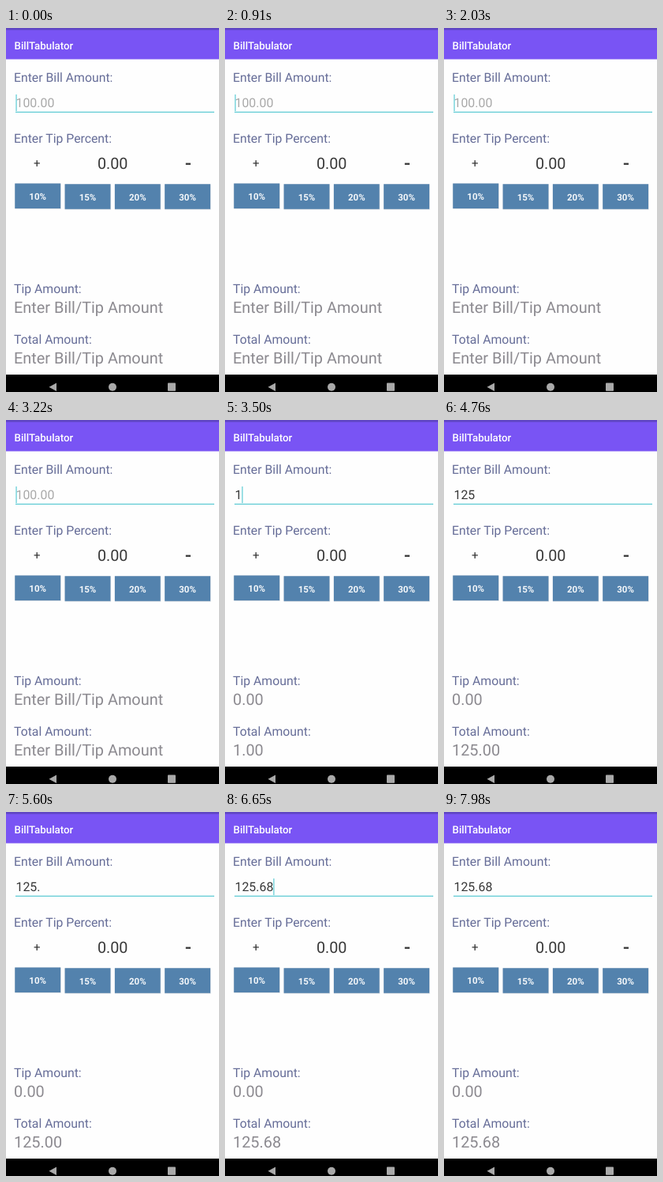
Animation, 270 px wide and 460 px high, one loop 8 s. Source, as an HTML page:

```html
<!DOCTYPE html>
<html lang="en">
<head>
<meta charset="utf-8">
<style>
  html, body { margin: 0; width: 100%; height: 100%; overflow: hidden; background: #fefefe; }
  svg { display: block; width: 270px; height: 460px; font-family: Roboto, sans-serif; text-rendering: geometricPrecision; }
  .label { font-size: 15.8px; fill: #666d98; }
  .result { font-size: 19.9px; fill: #8c8a90; }
  .mid { text-anchor: middle; fill: #383838; }
  .button { text-anchor: middle; font-size: 11.5px; font-weight: 700; fill: #f4f7fa; }
</style>
</head>
<body>
<svg viewBox="0 0 270 460">
  <rect width="270" height="460" fill="#fefefe"/>
  <rect width="270" height="39.5" fill="#7954f4"/>
  <rect width="270" height="2.5" fill="#5f45c2"/>
  <text x="10.5" y="27" font-size="13.3" font-weight="500" fill="#fff">BillTabulator</text>

  <text class="label" x="10" y="67.6">Enter Bill Amount:</text>
  <text id="bill" x="12.5" y="100.2" font-size="15.9"></text>
  <rect x="12" y="105.7" width="252" height="1.2" fill="#56c8d2"/>
  <rect id="caret" y="84" width="1.1" height="21" fill="#4cc6cf"/>

  <text class="label" x="10" y="144.6">Enter Tip Percent:</text>
  <text class="mid" x="39.2" y="176" font-size="15">+</text>
  <text class="mid" x="135.2" y="178" font-size="19.8">0.00</text>
  <text class="mid" x="231" y="178.8" font-size="24" font-weight="500">-</text>
  <g id="buttons"></g>

  <text class="label" x="10" y="334.8">Tip Amount:</text>
  <text class="result" id="tip" x="10" y="360"></text>
  <text class="label" x="10" y="398.6">Total Amount:</text>
  <text class="result" id="total" x="10" y="424"></text>

  <rect y="438" width="270" height="22"/>
  <g fill="#a9a9a9">
    <path d="M54.5 453.7 L64 448.4 V459 Z"/>
    <circle cx="135" cy="453.7" r="5"/>
    <rect x="205" y="448.5" width="10" height="10.3" rx="0.8"/>
  </g>
</svg>
<script>
  const LOOP = 8000;
  const HINT = 'Enter Bill/Tip Amount';
  const $ = id => document.getElementById(id);

  // [start in ms, typed text]
  const typing = [[0, ''], [3430, '1'], [3920, '12'], [4200, '125'],
                  [5110, '125.'], [5880, '125.6'], [6230, '125.68']];
  // the caret starts visible and flips at each of these times
  const flips = [420, 910, 1470, 2030, 2450, 2940, 4690, 5110, 5600, 5880, 6720, 7210, 7700];

  // the first button sits slightly higher than the others
  $('buttons').innerHTML = [10, 15, 20, 30].map((p, i) => {
    const x = 11.3 + i * 63.3, y = i ? 197.3 : 196.5;
    return `<rect x="${x}" y="${y}" width="58.5" height="32.3" fill="#d5dae0"/>
      <rect x="${x}" y="${y}" width="57.8" height="31.5" fill="#5382ad"/>
      <text class="button" x="${x + 28.9}" y="${y + 20.2}">${p}%</text>`;
  }).join('');

  let shown = null;

  function setText(value) {
    if (value === shown) return;
    shown = value;
    const bill = $('bill');
    bill.textContent = value || '100.00';
    bill.setAttribute('fill', value ? '#383838' : '#a9a9a9');
    $('tip').textContent = value ? '0.00' : HINT;
    $('total').textContent = value ? Number(value).toFixed(2) : HINT;
    $('caret').setAttribute('x', 12.5 + (value && bill.getComputedTextLength()));
  }

  function draw(t) {
    setText(typing.filter(step => step[0] <= t).pop()[1]);
    const hidden = flips.filter(f => f <= t).length % 2;
    $('caret').setAttribute('visibility', hidden ? 'hidden' : 'visible');
  }

  const start = performance.now();
  function tick(now) {
    draw(Math.max(0, now - start) % LOOP);
    requestAnimationFrame(tick);
  }
  draw(0);
  requestAnimationFrame(tick);
</script>
</body>
</html>
```
